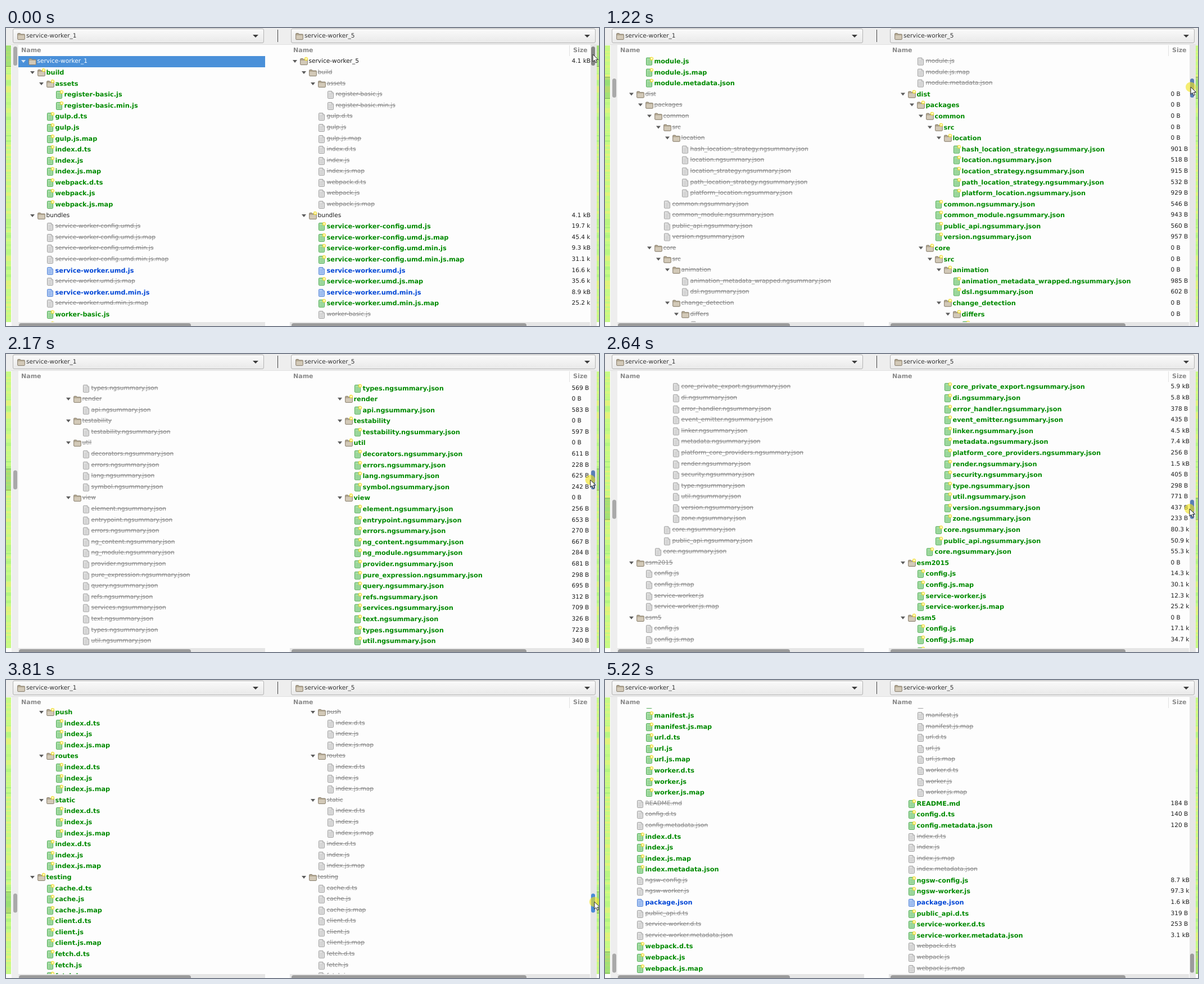
Write an HTML page that moves like this. It is 1055x531 px and loops after 5850 ms.

```html
<!DOCTYPE html>
<html lang="en">
<head>
<meta charset="utf-8">
<title>Folder comparison</title>
<style>
  html, body { margin: 0; width: 100%; height: 100%; overflow: hidden; }
  #stage {
    position: relative; width: 1055px; height: 531px; overflow: hidden;
    background: #fdfdfd; color: #1c1c1c;
    font: 10.55px/20px "DejaVu Sans", sans-serif;
    text-rendering: geometricPrecision; white-space: pre;
  }
  #stage div, #stage svg, #stage span { position: absolute; }
  .bar { left: 0; top: 0; width: 1055px; height: 29px; background: #eeeeee; border-bottom: 1px solid #e0e0e0; }
  .combo {
    top: 1px; height: 24px; border: 1px solid #b4b4b4; border-radius: 3px; color: #333;
    background: linear-gradient(#fafafa, #e9e9e9);
  }
  .combo svg { left: 7px; top: 5px; }
  .combo span { left: 23px; top: 2px; }
  .combo i {
    position: absolute; right: 9px; top: 10px;
    border: 5px solid transparent; border-top-color: #3c3c3c; border-bottom: 0;
  }
  .split { left: 483px; top: 3px; width: 1px; height: 22px; background: #444; }
  .head { top: 30px; color: #8a8a8a; font-weight: bold; font-size: 11px; }
  .col { left: 1002px; top: 31px; width: 1px; height: 19px; background: #e0e0e0; }
  .view { top: 50px; height: 474px; overflow: hidden; }
  .list { left: 0; top: 0; width: 100%; }
  .row { left: 0; width: 100%; height: 19.59px; line-height: 19.59px; }
  .row .size { left: 501.5px; }
  .tri { top: 7px; border: 4.5px solid transparent; border-top: 5px solid #5c5c5c; border-bottom: 0; }
  .new .name, .mod .name { font-weight: bold; font-size: 11.3px; }
  .new .name { color: #008a00; }
  .mod .name { color: #0046d6; }
  .gone .name { color: #868686; text-decoration: line-through; }
  .picked { background: #4a90d9; color: #fff; }
  .picked .tri { border-top-color: #d6e4f4; }
  .row { --fill: #dedede; --edge: #a0a0a0; }
  .new { --fill: #a5dda5; --edge: #4fa955; }
  .mod { --fill: #a9c5f2; --edge: #5a88d8; }
  .trough { background: #e6e6e6; }
  .thumb { background: #9b9b9b; border-radius: 4px; }
  .map { top: 31px; height: 493px; background: #c6fa86; overflow: hidden; }
  .band {
    left: 0; top: -1px; width: 100%; height: 37px; background: rgba(84, 172, 88, .32);
    border: solid rgba(80, 130, 70, .55); border-width: 1px 0;
  }
  #glow { left: -9px; top: -9px; width: 18px; height: 18px; border-radius: 50%; background: rgba(240, 228, 30, .62); }
  #pointer { left: 0; top: 0; width: 0; height: 0; }
</style>
</head>
<body>
<svg width="0" height="0" style="position:absolute">
  <symbol id="file" viewBox="0 0 14 16">
    <path d="M1.5 2.5q0-1 1-1h6l3 3v9q0 1-1 1h-8q-1 0-1-1z" fill="var(--fill)" stroke="var(--edge)"/>
    <path d="M8.5 1.5v3h3" fill="#fff" fill-opacity=".6" stroke="var(--edge)" stroke-width=".8"/>
    <path d="M3.5 6.5h6M3.5 9h6M3.5 11.5h6" stroke="var(--edge)" stroke-opacity=".45" stroke-width=".8"/>
  </symbol>
  <symbol id="folder" viewBox="0 0 14 16">
    <path d="M.7 3.5q0-1 1-1h3.5l1.3 1.6h6q.8 0 .8.9v7.6q0 1-1 1H1.7q-1 0-1-1z" fill="#b3a892" stroke="#857b6a"/>
    <path d="M1.3 6h11.4v6.3q0 .7-.7.7H2q-.7 0-.7-.7z" fill="#d2c9b8"/>
  </symbol>
  <symbol id="spark" viewBox="0 0 8 8">
    <path d="M4 .3l1 1.5 1.8-.4-.4 1.8L7.8 4 6.4 5l.4 1.8-1.8-.4L4 7.8 3 6.4l-1.8.4.4-1.8L.2 4l1.4-1-.4-1.8 1.8.4z" fill="#efdc2c"/>
    <circle cx="4" cy="4" r="1.8" fill="#fffbd0"/>
  </symbol>
</svg>
<div id="stage">
  <div class="bar"></div>
  <div class="combo" style="left:12px;width:445px"><svg width="14" height="16"><use href="#folder"/></svg><span>service-worker_1</span><i></i></div>
  <div class="split"></div>
  <div class="combo" style="left:507px;width:540px"><svg width="14" height="16"><use href="#folder"/></svg><span>service-worker_5</span><i></i></div>
  <span class="head" style="left:27px">Name</span>
  <span class="head" style="left:511px">Name</span>
  <span class="head" style="left:1009px">Size</span>
  <div class="col"></div>

  <div class="map" style="left:0;width:9px"></div>
  <div class="trough" style="left:10px;top:30px;width:12px;height:501px;background:#eeeeee"></div>
  <div class="view" style="left:22px;width:439px"><div class="list"></div></div>
  <div class="view" style="left:505px;width:534.5px"><div class="list"></div></div>
  <div class="trough" style="left:1039.5px;top:30px;width:11.5px;height:501px"></div>
  <div class="map" style="left:1051px;width:4px"></div>

  <div class="trough" style="left:22px;top:524px;width:439px;height:7px"></div>
  <div class="trough" style="left:505px;top:524px;width:534px;height:7px"></div>
  <div class="thumb" style="left:23px;top:526px;width:306px;height:8px"></div>
  <div class="thumb" style="left:508px;top:526px;width:418px;height:8px"></div>
  <div class="thumb slide" style="left:12.5px;top:32.5px;width:7px;height:34px;background:#a9a9a9"></div>
  <div class="thumb slide" id="grip" style="left:1041px;top:32.5px;width:7px;height:34px"></div>

  <div id="pointer">
    <div id="glow"></div>
    <svg width="13" height="19" style="left:-1px;top:-1px"><path d="M1 1v13l3.1-2.8 2 4.8 2.3-1-2-4.6h4.2z" fill="#fff" stroke="#222"/></svg>
  </div>
</div>
<script>
// One line per run of siblings: depth, state, names.
// States: A only left, B only right, M modified, N same.
const TREE = `
0N service-worker/
1A build/
2A assets/
3A register-basic.js register-basic.min.js
2A gulp:t index:t webpack:t
1N bundles/
2B service-worker-config.umd:u
2M service-worker.umd.js
2B service-worker.umd.js.map
2M service-worker.umd.min.js
2B service-worker.umd.min.js.map
2A worker-basic.js worker-basic.min.js
1A companion/
2A comm:m index:m module:m
1B dist/
2B packages/
3B common/
4B src/
5B location/
6B hash_location_strategy:s location:s location_strategy:s path_location_strategy:s platform_location:s
4B common:s common_module:s public_api:s version:s
3B core/
4B src/
5B animation/
6B animation_metadata_wrapped:s dsl:s
5B change_detection/
6B differs/
7B default_iterable_differ:s default_keyvalue_differ:s iterable_differs:s keyvalue_differs:s
6B change_detection:s change_detection_util:s change_detector_ref:s constants:s pipe_transform:s
5B debug/
6B debug_node:s
5B di/
6B forward_ref:s injection_token:s injector:s metadata:s provider:s reflective_injector:s reflective_key:s reflective_provider:s
5B i18n/
6B tokens:s
5B linker/
6B compiler:s component_factory:s component_factory_resolver:s element_ref:s ng_module_factory:s ng_module_factory_loader:s query_list:s system_js_ng_module_factory_loader:s template_ref:s view_container_ref:s view_ref:s
5B metadata/
6B di:s directives:s lifecycle_hooks:s ng_module:s view:s
5B profile/
6B profile:s wtf_impl:s
5B reflection/
6B platform_reflection_capabilities:s reflection:s reflection_capabilities:s reflector:s types:s
5B render/
6B api:s
5B testability/
6B testability:s
5B util/
6B decorators:s errors:s lang:s symbol:s
5B view/
6B element:s entrypoint:s errors:s ng_content:s ng_module:s provider:s pure_expression:s query:s refs:s services:s text:s types:s util:s view:s view_attach:s
5B zone/
6B ng_zone:s
5B application_init:s application_ref:s application_tokens:s change_detection:s core_private_export:s di:s error_handler:s event_emitter:s linker:s metadata:s platform_core_providers:s render:s security:s type:s util:s version:s zone:s
4B core:s public_api:s
3B core:s
1B esm2015/
2B config:j service-worker:j
1B esm5/
2B config:j service-worker:j
1A generator/
2A config:t generator:t index:t manifest:t
1A plugins/
2A assets/
3A index:t
2A content/
3A index:t
2A dynamic/
3A api:t cache:t dynamic:t group:t index:t linked:t manifest:t
2A external/
3A index:t
2A push/
3A index:t
2A routes/
3A index:t
2A static/
3A index:t
2A index:t
1A testing/
2A cache:t client:t fetch:t index:t utils.d.ts utils.js
1A worker/
2A builtin/
3A cache:t events:t fetch:t index:t
2A api:t bootstrap:t cache:t common:t driver:t fetch:t index:t manifest:t url:t worker:t
1B README.md config.d.ts config.metadata.json
1A index:m
1B ngsw-config.js ngsw-worker.js
1M package.json
1B public_api.d.ts service-worker.d.ts service-worker.metadata.json
1A webpack:t`;

const SUFFIXES = {
  t: '.d.ts .js .js.map',
  m: '.d.ts .js .js.map .metadata.json',
  u: '.js .js.map .min.js .min.js.map',
  j: '.js .js.map',
  s: '.ngsummary.json',
};

// Sizes of consecutive sized rows, keyed by the first row
const SIZES = {
  0: '4.1k',
  14: '4.1k 19.7k 45.4k 9.3k 31.1k 16.6k 35.6k 8.9k 25.2k',
  69: '2.0k 4.1k 469 309 986 2.0k 1.3k 1.5k 377 1.6k 0 789 4.1k 1.4k 488 1.6k 254 640 728 628 689 251 536 719 0',
  139: '5.9k 5.8k 378 435 4.5k 7.4k 256 1.5k 405 298 771 437 233 80.3k 50.9k 55.3k 0 14.3k 30.1k 12.3k 25.2k 0 17.1k 34.7k 13.0k 28.4k',
  287: '184 140 120',
  294: '8.7k 97.3k 1.6k 319 253 3.1k',
};

const PITCH = 19.59, END = 5462, LOOP = 5850;
const $$ = s => [...document.querySelectorAll(s)];

function parse() {
  const rows = [];
  for (const line of TREE.trim().split('\n')) {
    const [key, ...names] = line.split(' ');
    for (const token of names) {
      const [base, code] = token.split(':');
      const ends = code ? SUFFIXES[code].split(' ') : [''];
      for (const end of ends) {
        rows.push({ depth: +key[0], state: key[1], name: base.replace('/', '') + end, dir: base.endsWith('/') });
      }
    }
  }
  for (const first in SIZES) SIZES[first].split(' ').forEach((s, i) => { rows[+first + i].size = s; });
  return rows;
}

function sizeText(row, i) {
  if (row.state === 'A') return '';
  const s = row.size || (row.dir ? '0' : String(210 + i * 397 % 780));
  return s.endsWith('k') ? s.slice(0, -1) + ' kB' : s + ' B';
}

const icon = (id, x, y, w, h) =>
  `<svg width="${w}" height="${h}" style="left:${x}px;top:${y}px"><use href="#${id}"/></svg>`;

function rowHtml(row, i, right) {
  const { depth, state, dir } = row;
  const kind = { N: '', M: 'mod', A: right ? 'gone' : 'new', B: right ? 'new' : 'gone' }[state];
  const x = 33.5 + 16 * depth;
  const name = i ? row.name : row.name + (right ? '_5' : '_1');
  const spark = kind === 'new' || (state === 'N' && right);
  return `<div class="row ${kind}${!i && !right ? ' picked' : ''}" style="top:${(0.4 + i * PITCH).toFixed(2)}px">` +
    (dir ? `<div class="tri" style="left:${x - 29}px"></div>` : '') +
    icon(dir ? 'folder' : 'file', x - 16, 2, 14, 16) +
    (spark ? icon('spark', x - 9, 1, 8, 8) : '') +
    `<span class="name" style="left:${x}px">${name}</span>` +
    (right ? `<span class="size">${sizeText(row, i)}</span>` : '') + '</div>';
}

function mapHtml() {
  let seed = 11, html = '';
  const rnd = () => (seed = seed * 16807 % 2147483647) / 2147483647;
  for (let y = 2; y < 493;) {
    const h = 1 + Math.floor(rnd() * rnd() * 14);
    const hue = rnd() < 0.75 ? '240,240,120' : '160,236,125';
    html += `<div style="left:0;top:${y}px;width:100%;height:${h}px;background:rgba(${hue},${(0.25 + rnd() * 0.45).toFixed(2)})"></div>`;
    y += h + 1 + Math.floor(rnd() * 8);
  }
  return html + '<div class="band"></div>';
}

const rows = parse();
const lists = $$('.list');
lists.forEach((el, side) => { el.innerHTML = rows.map((r, i) => rowHtml(r, i, side)).join(''); });
$$('.map').forEach(el => { el.innerHTML = mapHtml(); });
const bands = $$('.band'), slides = $$('.slide');
const grip = document.getElementById('grip');
const glow = document.getElementById('glow');
const pointer = document.getElementById('pointer');

const STAGES = [
  [533, 1, 0, 1044, 47, '#3f7ad8'],
  [840, 4, 236.3, 1044, 66, '#3f7ad8'],
  [1620, 10, 1361.5, 1039, 164, '#5a7fb6'],
  [2640, 13, 2724.2, 1040, 276, '#5a7fb6'],
  [3430, 10, 3807.5, 1045, 364, '#868a90'],
  [4270, 11, 4818.3, 1050, 450, '#4a8ad8'],
  [4920, 8, END, 1052, 504, '#4a8ad8'],
  [5220, 4, END, 1059, 535, '#9b9b9b'],
];

function pose(t) {
  const k = STAGES.findIndex(s => t < s[0]);
  if (k < 0) return STAGES[STAGES.length - 1].slice(2);
  if (k === 0) return STAGES[0].slice(2);
  const a = STAGES[k - 1], b = STAGES[k];
  const step = Math.floor((t - a[0]) / (b[0] - a[0]) * b[1]);
  if (!step) return a.slice(2);
  const u = Math.pow(step / b[1], k === 1 ? 1.4 : 1);
  const mix = i => a[i] + (b[i] - a[i]) * u;
  return [mix(2), mix(3), mix(4), b[5]];
}

function draw(now) {
  const t = now % LOOP;
  const [scroll, x, y, colour] = pose(t);
  const f = scroll / END;
  lists.forEach(el => { el.style.transform = `translateY(${-scroll}px)`; });
  bands.forEach(el => { el.style.transform = `translateY(${454 * f}px)`; });
  slides.forEach(el => { el.style.transform = `translateY(${454.5 * f}px)`; });
  pointer.style.transform = `translate(${x}px,${y}px)`;
  grip.style.background = t < 220 ? '#858585' : colour;
  glow.style.opacity = t < 220 || t >= 4990 ? 0 : t < 300 ? 0.5 : 1;
  requestAnimationFrame(draw);
}
draw(performance.now());
</script>
</body>
</html>
```
